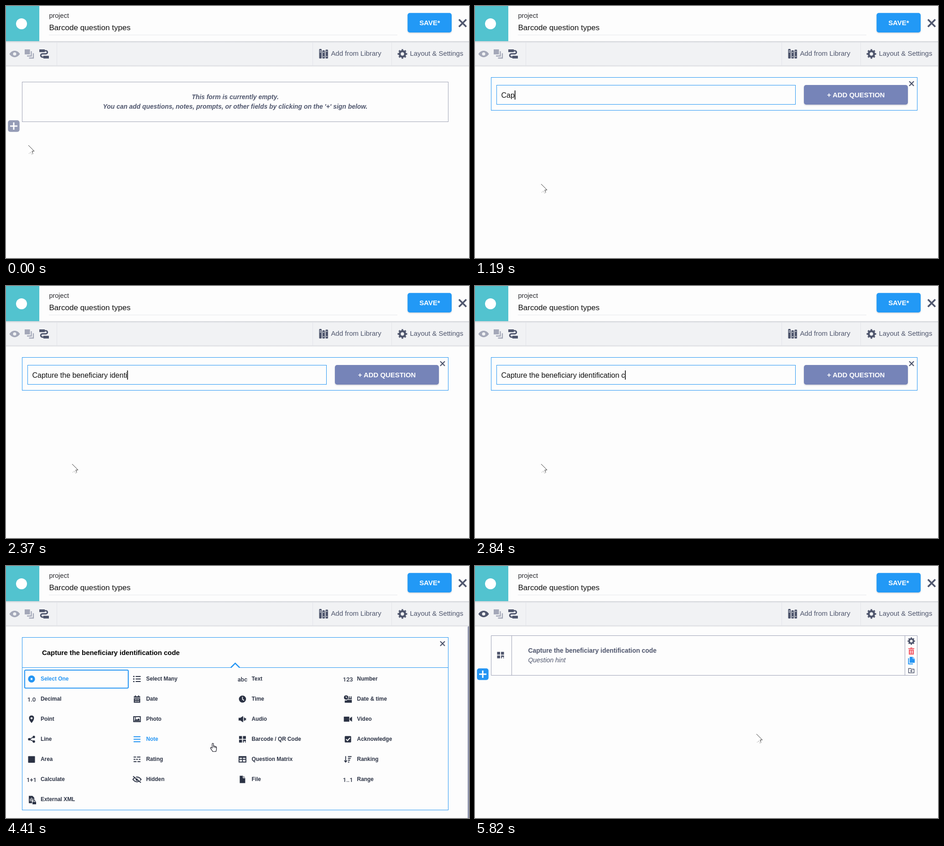
Animation, 1015 px wide and 552 px high, one loop 6.82 s. Source, as an HTML page:

```html
<!DOCTYPE html>
<html lang="en">
<head>
<meta charset="utf-8">
<title>Form builder</title>
<style>
html, body { margin: 0; width: 100%; height: 100%; overflow: hidden; background: #fdfdfd; }
svg { display: block; width: 100vw; height: 100vh; font-family: "Liberation Sans", Arial, sans-serif; }
text { white-space: pre; fill: currentColor; }
.b { font-weight: bold; }
.i { font-style: italic; }
.m { text-anchor: middle; }
.s15 { font-size: 14.93px; }
.s14 { font-size: 13.93px; }
.ln { fill: none; stroke: currentColor; stroke-width: 2; }
.f { fill: currentColor; }
.slate { color: #4f566d; }
.pale { color: #a4a8b8; }
.blue { color: #2495f3; }
.box { fill: none; stroke: currentColor; }
#items { color: #2b3244; font-size: 11.9px; font-weight: bold; }
#items .ic { font: 500 13px Roboto, sans-serif; text-anchor: middle; }
#items .on { color: #2495f3; }
</style>
</head>
<body>
<svg viewBox="0 0 1015 552" preserveAspectRatio="none">
  <defs>
    <filter id="sh" x="-10%" y="-20%" width="120%" height="150%">
      <feDropShadow dx="0" dy="1.5" stdDeviation="1" flood-color="#334" flood-opacity=".22"/>
    </filter>
    <linearGradient id="fade" x2="0" y2="1">
      <stop stop-color="#cfd1d6"/><stop offset="1" stop-color="#cfd1d6" stop-opacity="0"/>
    </linearGradient>
    <g id="cross"><path class="ln" d="M-1 -1L1 1M1 -1L-1 1" style="stroke-width:.46"/></g>
    <g id="gear">
      <circle class="ln" r="6" style="stroke-width:4.6"/>
      <circle class="ln" r="8.8" pathLength="16" stroke-dasharray="1 1" stroke-dashoffset=".5" style="stroke-width:3.4"/>
    </g>
    <g id="add">
      <rect class="f" x=".3" y=".3" width="25.4" height="25.4" rx="5"/>
      <path d="M13 5V21M5 13H21" stroke="#fff" stroke-width="3"/>
    </g>
    <g id="grid">
      <path class="f" d="M-7.5 -7H-1V-.8H-7.5ZM1 -7H7.5V-.8H1ZM-7.5 1H-1V7.2H-7.5ZM1 1H7.5V5H5.5L4 3.8H3V7.2H1ZM5.5 6H7.5V7.2H5.5Z"/>
    </g>
  </defs>

  <rect width="1015" height="552" fill="#fdfdfd"/>

  <!-- header -->
  <rect y="78" width="1015" height="53" fill="#f1f2f4"/>
  <rect y="77" width="1015" height="4" fill="url(#fade)"/>
  <rect y="130" width="1015" height="4" fill="url(#fade)" opacity=".75"/>
  <path d="M111.5 80V130M672.5 80V130M845.5 80V130" stroke="#e2e4e9"/>
  <rect width="73" height="77" fill="#52c3cf"/>
  <circle cx="34" cy="39" r="12" fill="#fff"/>
  <text x="94.4" y="26" font-size="14.5" color="#2a2a2e">project</text>
  <text x="94.4" y="53" font-size="17.1" color="#111">Barcode question types</text>
  <path d="M94 63.5H858" stroke="#e6e7ea"/>
  <rect x="880.3" y="15.3" width="96.7" height="42.7" rx="5" fill="#2499f6" filter="url(#sh)"/>
  <text class="b m s15" x="928.8" y="42" color="#fff">SAVE*</text>
  <use href="#cross" class="slate" transform="translate(1001 37.5) scale(8)"/>

  <!-- toolbar -->
  <g id="eye" transform="translate(19 105)">
    <path class="f" d="M-11.5 0C-6 -9.5 6 -9.5 11.5 0C6 9.5 -6 9.5 -11.5 0Z"/>
    <circle r="3.6" fill="#f1f2f4"/>
  </g>
  <g class="pale">
    <rect class="f" x="41" y="95" width="11.5" height="11"/>
    <path class="ln" d="M55.5 99V109.5H46M60 103.5V114H50.5" style="stroke-width:2.3"/>
  </g>
  <g class="slate">
    <path class="ln" d="M84 98H87C92 98 92 104.7 87 104.7H80C75 104.7 75 112 80 112H84" style="stroke-width:3"/>
    <path class="f" d="M73 95H85V101H73ZM82 109H94V115H82Z"/>
    <g class="f"><rect x="686.5" y="94" width="5.5" height="21" rx="1.5"/><rect x="693.5" y="97" width="5.5" height="18" rx="1.5"/><rect x="700.5" y="95.5" width="5.5" height="19.5" rx="1.5"/></g>
    <path d="M688 98H690.5M688 101H690.5M695 101.5H697.5M695 111H697.5M702 99.5H704.5M702 110.5H704.5" stroke="#f1f2f4" stroke-width="1.5"/>
    <use href="#gear" x="869" y="105"/>
    <text class="s15" x="712.4" y="109">Add from Library</text>
    <text class="s15" x="885.4" y="109">Layout &amp; Settings</text>
  </g>

  <!-- empty form -->
  <g id="empty">
    <rect class="box" x="35.5" y="166.5" width="934" height="87" color="#9fa3b5"/>
    <g class="slate b i m s14">
      <text x="502.5" y="204">This form is currently empty.</text>
      <text x="502.5" y="225">You can add questions, notes, prompts, or other fields by clicking on the '+' sign below.</text>
    </g>
    <use href="#add" x="4" y="250" color="#959cb6"/>
  </g>

  <!-- new question -->
  <g id="ask">
    <g class="blue">
      <rect class="box" x="35.5" y="156.5" width="934" height="72"/>
      <rect class="box" x="47.5" y="173.5" width="655" height="42"/>
    </g>
    <text id="typed" x="57.5" y="201" font-size="16" color="#111"></text>
    <rect id="caret" y="185" width="1.6" height="20" fill="#000"/>
    <rect x="721" y="173" width="228" height="43" rx="5" fill="#7684b8" filter="url(#sh)"/>
    <text class="b m s15" x="835" y="200" color="#fff">+ ADD QUESTION</text>
    <use href="#cross" class="slate" transform="translate(957 170) scale(5)"/>
  </g>

  <!-- question types -->
  <g id="menu">
    <g class="blue">
      <rect class="box" x="35.5" y="156.5" width="934" height="378"/>
      <path class="box" d="M36 222.5H494M511 222.5H969"/>
      <path class="ln" d="M493 222.5L502.5 213L512 222.5" style="stroke-width:2.5"/>
      <rect class="ln" x="41" y="228" width="227" height="39.5" rx="2"/>
    </g>
    <text class="b s15" x="79" y="195" color="#000">Capture the beneficiary identification code</text>
    <use href="#cross" class="slate" transform="translate(957 170) scale(5)"/>
    <g id="items"></g>
    <path d="M1015 132H1014Q1012 132 1012 135V552H1015Z" fill="#9297ae"/>
  </g>

  <!-- finished question -->
  <g id="card">
    <path class="box" d="M35.5 152.5H969.5V239.5H35.5ZM80.5 153V239M942.5 153V239" color="#9da1b6"/>
    <g class="slate">
      <use href="#grid" x="56" y="195"/>
      <text class="b s14" x="116.5" y="190">Capture the beneficiary identification code</text>
      <text class="i s14" x="116.5" y="211">Question hint</text>
      <use href="#gear" transform="translate(956.5 164.5) scale(.78)"/>
      <path class="ln" d="M950.5 224.5H955L956.5 226H962.5V234H950.5ZM956.5 227.5V232.5M954 230H959" style="stroke-width:1.4"/>
    </g>
    <g color="#f2606c">
      <path class="f" d="M950 180H954L955 178.5H958L959 180H963V182H950ZM951 183H962V194H951Z"/>
      <path d="M954.5 185V192M958.5 185V192" stroke="#fdfdfd" stroke-width="1.5"/>
    </g>
    <g class="blue">
      <path class="f" d="M953 199H960L964 203V212H953Z"/>
      <path class="ln" d="M950.5 202V214.5H960"/>
      <path d="M960 199V203H964" fill="none" stroke="#fff"/>
      <use href="#add" x="4" y="224"/>
    </g>
  </g>

  <g id="cursor">
    <g id="arrow">
      <path d="M0 0L13 13H8.5L10.5 19L7.5 20.5L5 15.5L1 18.5Z" fill="#fff"/>
      <path d="M0 0L13 13H8L10 18.5" fill="none" stroke="#333"/>
      <path d="M10 19L7.5 20.5L5 15L1 18.5" fill="none" stroke="#666" stroke-width=".9" stroke-dasharray="1 1.2"/>
    </g>
    <g id="hand" fill="#fff" stroke="#1c1c28" stroke-width="1.2" stroke-linejoin="round">
      <path d="M-1.6 11V1.8C-1.6 -.2 1.4 -.2 1.4 1.8V7C2 5.8 4 6 4 7.5C4.6 6.5 6.2 7 6.2 8.3C7 7.5 8 8.2 8 9.5V13C8 15 6.8 16 6.8 18.5H-.5C-.8 16.5 -4 14 -5 11C-5.6 9 -3.6 8.4 -1.6 11Z"/>
      <path d="M1.4 7V10M4 8V10.5M6.2 8.5V11" fill="none" stroke-width=".9"/>
    </g>
  </g>
</svg>
<script>
const LOOP = 6820;
const PHRASE = "Capture the beneficiary identification code";
const $ = id => document.getElementById(id);
const fill = d => `<path class="f" d="${d}"/>`;
const line = (d, w = 2) => `<path class="ln" d="${d}" style="stroke-width:${w}"/>`;
const cut = (d, w = 1.4, dash = "none") =>
  `<path d="${d}" fill="none" stroke="#fdfdfd" stroke-width="${w}" stroke-dasharray="${dash}"/>`;
const dot = (x, y, r) => `<circle class="f" cx="${x}" cy="${y}" r="${r}"/>`;
const word = s => `<text class="ic" y="5">${s}</text>`;

const icons = {
  one: '<circle class="ln" r="5" style="stroke-width:5.4"/>',
  many: dot(-7, -5.5, 1.6) + dot(-7, 0, 1.6) + dot(-7, 5.5, 1.6) + line("M-3 -5.5H8M-3 0H8M-3 5.5H8"),
  date: fill("M-7 -6H7V8H-7Z") + line("M-3.5 -8V-5M3.5 -8V-5") + cut("M-7 -2.5H7") +
    cut("M-4.5 1H4.5M-4.5 5H4.5", 2, "2 1.5"),
  clock: dot(0, 0, 7.8) + cut("M0 -5V.5L3.5 3", 1.6),
  both: fill("M-2 -2H8.5V8H-7V3H-2Z") + line("M3 -6V-2M7 -6V-2") + cut("M-1 1H8.5") +
    '<circle cx="-4" cy="-3.5" r="5.8" fill="#fdfdfd"/>' + dot(-4, -3.5, 4.8) + cut("M-4 -6.5V-3H-1.5", 1.2),
  point: fill("M0 8.5C-8 -.5 -6.5 -8 0 -8C6.5 -8 8 -.5 0 8.5Z") + '<circle cy="-2" r="2.3" fill="#fdfdfd"/>',
  photo: line("M-7.3 -5.5H7.3V5.5H-7.3Z") + fill("M-5.5 4V2L-2.5 -1L0 1.5L3 -2L5.5 1V4Z") + dot(-3.5, -2.5, 1.4),
  audio: fill("M-8.5 -3H-4.5L1.5 -7V7L-4.5 3H-8.5ZM3 -4C7.5 -3 7.5 3 3 4Z") + line("M7 -2.5V2.5", 1.5),
  video: fill("M-9 -5.5H3V5.5H-9ZM4 -2L9 -5.5V5.5L4 2Z"),
  route: line("M5 -5L-5 0L5 5", 1.8) + dot(5, -5, 2.7) + dot(-5, 0, 2.7) + dot(5, 5, 2.7),
  note: line("M-7.5 -5.5H7.5M-7.5 0H7.5M-7.5 5.5H7.5"),
  grid: '<use href="#grid"/>',
  check: '<rect class="f" x="-7" y="-7" width="14" height="14" rx="1.5"/>' + cut("M-4 0L-1 3L4.5 -3", 2),
  area: '<rect class="f" x="-7.5" y="-7" width="15" height="14.5" rx="1"/>',
  rating: line("M-7.5 -5H7.5M-7.5 0H7.5M-7.5 5H7.5") + cut("M-2 -5H0M2 0H4M-3.5 0H-2M-1 5H1", 3),
  table: line("M-7.5 -6H7.5V6H-7.5ZM-7.5 0H7.5M0 -5V6") + line("M-8 -5H8", 3),
  rank: line("M-5 -7V5M-8 2.5L-5 6L-2 2.5M0 -6H8M0 -2H6M0 2H4.5M0 6H3", 1.8),
  hidden: line("M-9 0C-4 -7 4 -7 9 0C4 7 -4 7 -9 0Z") + dot(0, 0, 3) + cut("M-7 -8L9 6", 2) + line("M-8.5 -7L8.5 7"),
  file: fill("M-6 -8H1.5L6 -3.5V8H-6Z") + cut("M1.5 -8V-3.5H6"),
  xml: fill("M-6 -8H2L6 -4V8H-6Z") + cut("M-3 -2V4M0 -4V4M3 -2V3") +
    '<rect x="1" y="2" width="10" height="9" fill="#fdfdfd"/>' + fill("M2 5H10V10.5H2Z") + line("M4 5C4 1 8 1 8 5", 1.3)
};

const kinds = [
  ["Select One", icons.one], ["Select Many", icons.many], ["Text", word("abc")], ["Number", word("123")],
  ["Decimal", word("1.0")], ["Date", icons.date], ["Time", icons.clock], ["Date &amp; time", icons.both],
  ["Point", icons.point], ["Photo", icons.photo], ["Audio", icons.audio], ["Video", icons.video],
  ["Line", icons.route], ["Note", icons.note], ["Barcode / QR Code", icons.grid], ["Acknowledge", icons.check],
  ["Area", icons.area], ["Rating", icons.rating], ["Question Matrix", icons.table], ["Ranking", icons.rank],
  ["Calculate", word("1+1")], ["Hidden", icons.hidden], ["File", icons.file], ["Range", word("1..1")],
  ["External XML", icons.xml]
];
$("items").innerHTML = kinds.map(([label, icon], k) => {
  const x = 56 + 231.2 * (k % 4), y = 247 + 44 * Math.floor(k / 4);
  return `<g transform="translate(${x} ${y})"><g transform="translate(0 .5)">${icon}</g><text x="20" y="4">${label}</text></g>`;
}).join("");
const cells = [...$("items").children];

// time, x, y, hand?
const moves = [
  [0, 49, 305, 0], [70, 43, 295, 0], [140, 33, 281, 0], [210, 23, 269, 1], [280, 20, 265, 1],
  [490, 29.5, 273, 1], [550, 62, 318, 0], [620, 114, 368, 0], [690, 145, 390, 0],
  [3070, 145, 390, 1], [3800, 200, 382, 1], [4200, 246, 387, 1], [4270, 310, 388, 1],
  [4340, 383, 388, 1], [4410, 453.5, 388, 1], [4480, 526, 384, 1], [4550, 582, 377, 1],
  [4620, 609, 371, 1], [4690, 617, 368, 1], [5620, 617, 368, 0]
];
// start, end, first and last letter count
const bursts = [[1075, 1670, 1, 13], [1690, 1710, 14, 15], [1730, 2400, 16, 31], [2500, 2920, 32, 43]];

const latest = (list, t) => list.filter(e => e[0] <= t).pop();
const show = (id, on) => { $(id).style.display = on ? "" : "none"; };

function letters(t) {
  const b = latest(bursts, t);
  if (!b) return 0;
  const [from, to, a, z] = b;
  return Math.min(z, a + Math.floor((t - from) / (to - from) * (z - a) + 1e-6));
}

function draw(t) {
  show("empty", t < 420);
  show("ask", t >= 420 && t < 3070);
  show("menu", t >= 3070 && t < 5490);
  show("card", t >= 5490);
  $("eye").setAttribute("class", t < 5820 ? "pale" : "slate");

  const n = letters(t);
  $("typed").textContent = PHRASE.slice(0, n);
  $("caret").setAttribute("x", 57.5 + (n ? $("typed").getComputedTextLength() : 0));
  show("caret", t < 1030 || n > 0);

  const [, x, y, hand] = latest(moves, t);
  $("cursor").setAttribute("transform", `translate(${x} ${y})`);
  show("hand", hand);
  show("arrow", !hand);

  const over = 12 + Math.floor((x - 40) / 231);
  cells.forEach((c, k) => c.classList.toggle("on", k === 0 || k === over));
}

const start = performance.now();
function tick() {
  draw((performance.now() - start) % LOOP);
  requestAnimationFrame(tick);
}
tick();
</script>
</body>
</html>
```
